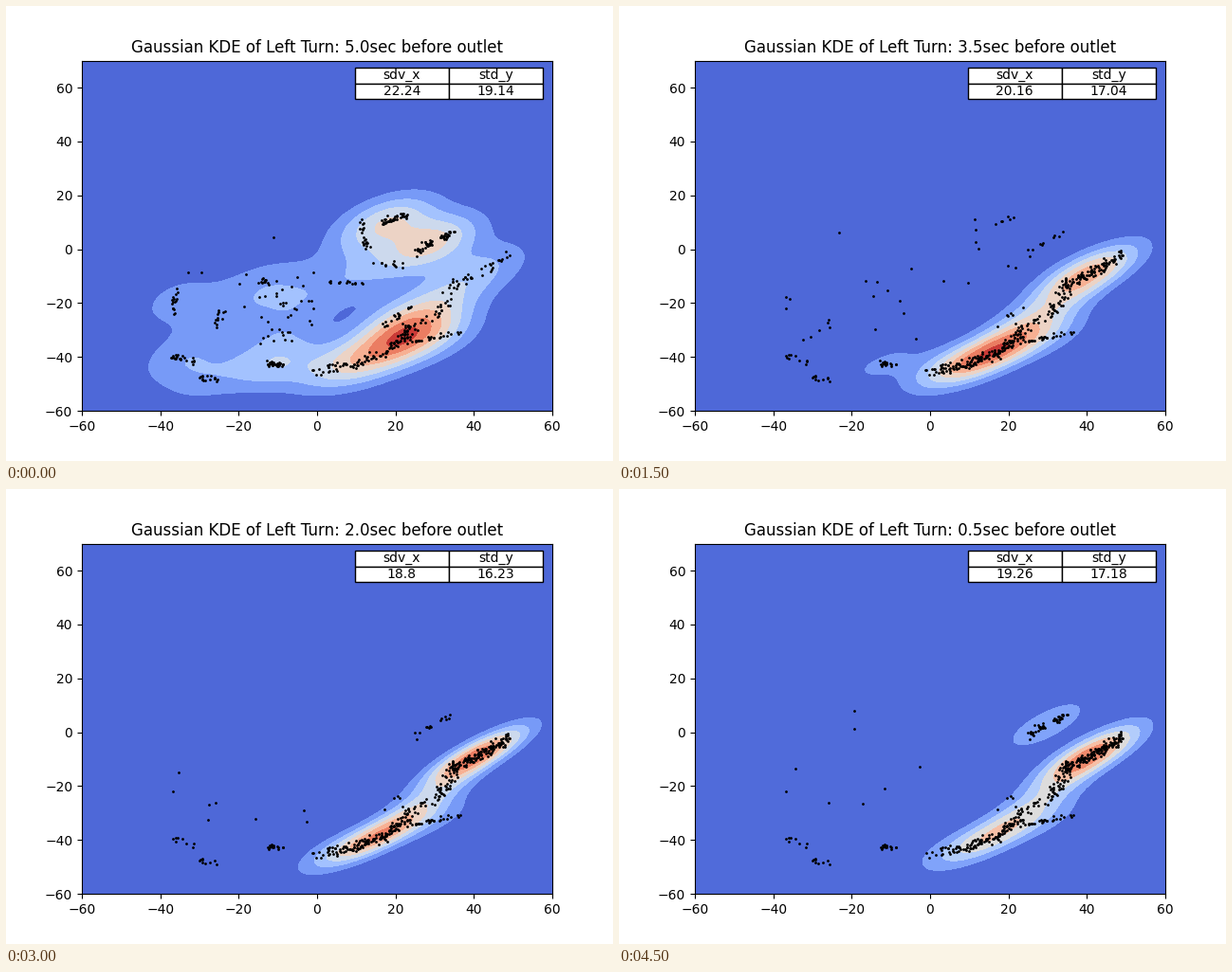
Write a matplotlib script that moves like this. It is 640 px wide and 480 px high and loops after 5 s.

```python
import numpy as np
import matplotlib.pyplot as plt
from matplotlib.animation import FuncAnimation

# Key points of the turning lane, from the approach to the outlet.
TURN = np.array([(0, -45.5), (10, -42.5), (18, -38), (23, -31),
                 (31, -23), (35, -13), (43, -7), (49, -2)])

# Queues: both ends, then the vehicles at the start and at the end.
FADING = [
    ((23, -34.5), (36, -30.5), 26, 28),
    ((22.5, -34), (23, -28), 18, 8),
    ((17, -28), (24, -21), 18, 4),
    ((11, 10.5), (12.5, 0), 22, 0),
    ((17, 10), (23, 13), 38, 0),
    ((15, -6), (22, -5.5), 12, 0),
    ((3, -12), (12, -13), 14, 0),
    ((-13.5, -42.3), (-8.8, -43), 30, 16),
    ((-30, -47.5), (-25.5, -48.5), 16, 9),
    ((-37, -39.5), (-31, -42), 20, 8),
    ((-25.5, -28), (-24.5, -23), 12, 1),
    ((-37.5, -27), (-36, -15), 16, 1),
    ((-15.5, -11.5), (-13, -12.2), 9, 0),
]
RETURNING = [
    ((25, -1.5), (30, 4), 32, 26),
    ((31.5, 4), (34.5, 6), 22, 20),
]

STD = [(22.24, 19.14), (22.26, 18.2), (21.73, 17.67), (20.16, 17.04),
       (18.94, 16.65), (18.71, 16.31), (18.8, 16.23), (19.37, 17.19),
       (19.42, 17.26), (19.26, 17.18)]
# Highest density, counted in contour steps.
PEAK = [7.4, 6.5, 7.0, 7.3, 7.3, 7.2, 7.0, 7.5, 6.3, 6.0]

X, Y = np.mgrid[-60:60:100j, -60:70:100j]


def fade(step):
    return np.exp(-(step / 2) ** 1.5)


def line_up(start, end, count, jitter, seed):
    """First `count` of a fixed pool of vehicles between two points."""
    rng = np.random.default_rng(seed)
    start, end = np.array(start), np.array(end)
    pool = start + rng.random((80, 1)) * (end - start)
    pool += rng.normal(0, jitter, pool.shape)
    return pool[:max(0, int(round(count)))]


def turn_point(s):
    k = np.arange(len(TURN))
    return np.interp(s, k, TURN[:, 0]), np.interp(s, k, TURN[:, 1])


def turn_lane(step):
    """Even traffic that gathers into two bunches, moving to the outlet."""
    f = fade(step)
    parts = []
    for i, s in enumerate(np.arange(.25, 7, .5)):
        early = 32 - 3 * s
        late = 44 + 22 * np.cos(2 * np.pi * (s - 1.3) / 4.2)
        late += 1.2 * (step - 4) * (s - 3.5)
        count = (early * f + late * (1 - f)) / 2
        parts.append(line_up(turn_point(s - .25), turn_point(s + .25),
                             count, .9, i))
    return parts


def queues(step):
    f = fade(step)
    parts = [line_up(a, b, early * f + late * (1 - f), .6, 50 + i)
             for i, (a, b, early, late) in enumerate(FADING)]
    parts += [line_up(a, b, early * f + late * (step / 9) ** 3, .6, 80 + i)
              for i, (a, b, early, late) in enumerate(RETURNING)]
    return parts


def loose(step):
    """Moving vehicles, at new places in every step."""
    rng = np.random.default_rng(100 + step)
    n = int(40 * fade(step))
    return [rng.uniform((-20, -36), (-1, -8), (n, 2)),
            rng.uniform((-40, -35), (-2, 8), (6, 2))]


def density(pts, std):
    r = np.corrcoef(pts.T)[0, 1]
    sx, sy = np.array(std) * len(pts) ** (-1 / 6)
    z = np.zeros_like(X)
    for px, py in pts:
        u, v = (X - px) / sx, (Y - py) / sy
        z += np.exp(-(u * u - 2 * r * u * v + v * v) / (2 * (1 - r * r)))
    return z


fig, ax = plt.subplots(figsize=(6.4, 4.8), dpi=100)


def draw(step):
    ax.clear()
    pts = np.vstack(turn_lane(step) + queues(step) + loose(step))
    z = density(pts, STD[step])
    levels = np.arange(int(PEAK[step]) + 2) * z.max() / PEAK[step]
    ax.contourf(X, Y, z, levels=levels, cmap="coolwarm",
                vmin=0, vmax=levels[-1])
    ax.plot(pts[:, 0], pts[:, 1], "k.", markersize=2)
    table = ax.table(cellText=[[str(s) for s in STD[step]]],
                     colLabels=["sdv_x", "std_y"], colWidths=[.2, .2],
                     cellLoc="center", loc="upper right")
    table.set_zorder(3)
    ax.set_xlim(-60, 60)
    ax.set_ylim(-60, 70)
    ax.set_title(f"Gaussian KDE of Left Turn: {5 - step / 2:.1f}sec before outlet")
    return []


anim = FuncAnimation(fig, draw, frames=10, interval=500, repeat=True,
                     repeat_delay=0, blit=False)
plt.show()
```
